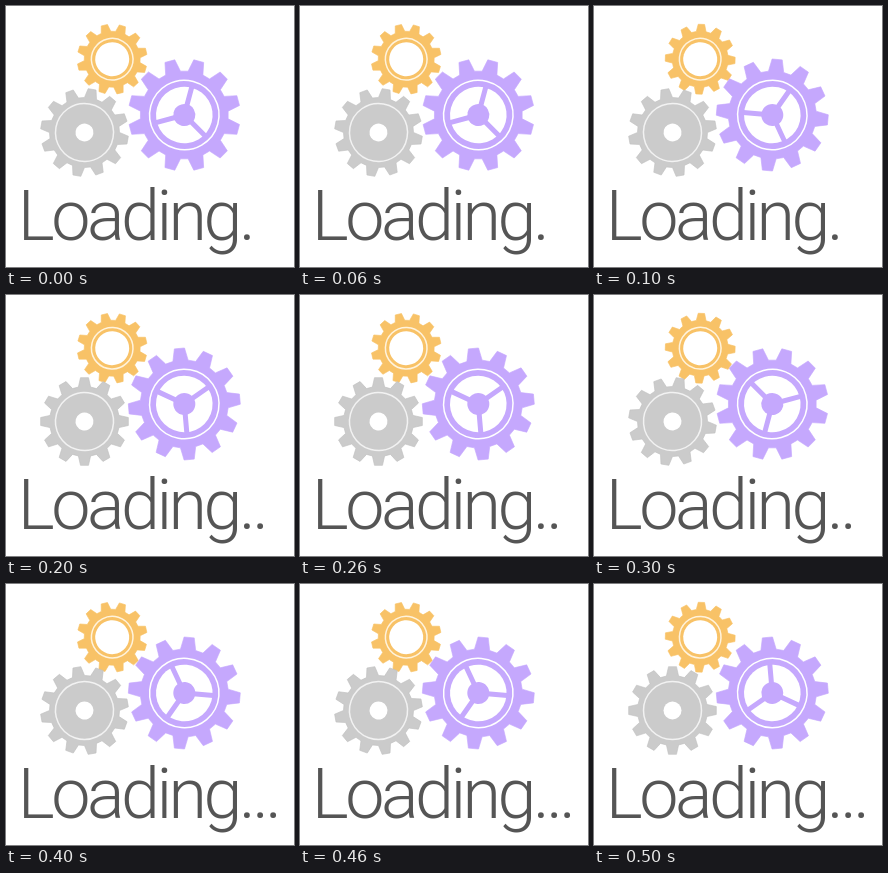
Recreate the animation shown at these times as an HTML page. Size 288x261 px, loop 0.6 s.

```html
<!DOCTYPE html>
<html lang="en">
<head>
<meta charset="utf-8">
<title>Loading</title>
<style>
  html, body { margin: 0; width: 100%; height: 100%; overflow: hidden; background: #fff; }
  svg { display: block; width: 100vw; height: 100vh; }
  text { font: 300 70px Roboto, "Open Sans", sans-serif; letter-spacing: -3.5px; fill: #555; }
</style>
</head>
<body>
<svg viewBox="0 0 288 261">
  <g id="gears"></g>
  <text id="label" x="11.8" y="234.2"></text>
</svg>
<script>
const STEP = 100, STEPS = 6, TEETH = 12;
const gearLayer = document.getElementById("gears");
const label = document.getElementById("label");

// start: angle of one tooth at time 0; turn: degrees per step
const gears = [
  { x: 106.2, y: 53.2, tip: 35, root: 28, ring: 20.8, hole: 17, color: "#f8c267", edge: "#f8c267", line: "#fff3dc", start: -103, turn: -15 },
  { x: 78.5, y: 126.5, tip: 44, root: 35, ring: 29, hole: 9, color: "#cbcbcb", edge: "#c0c0c0", line: "#f2f2f2", start: -80, turn: -20 },
  { x: 178.3, y: 109, tip: 56, root: 44, ring: 34.7, hole: 28.3, color: "#c5a8fd", edge: "#c5a8fd", line: "#fff", start: -75, turn: 20, hub: 11 }
];

function point(radius, degrees) {
  const a = degrees * Math.PI / 180;
  return (radius * Math.cos(a)).toFixed(2) + " " + (radius * Math.sin(a)).toFixed(2);
}

function outline({ tip, root }) {
  const points = [];
  for (let i = 0; i < TEETH; i++) {
    const a = i * 360 / TEETH;
    points.push(point(root, a - 10), point(tip, a - 5.2), point(tip, a + 5.2), point(root, a + 10));
  }
  return "M" + points.join("L") + "Z";
}

function spokes(g) {
  const bars = [0, 120, 240].map(a => `M0 0L${point(g.hole + 1, a)}`).join("");
  return `<path d="${bars}" stroke="${g.color}" stroke-width="5"/><circle r="${g.hub}" fill="${g.color}"/>`;
}

for (const g of gears) {
  g.node = document.createElementNS("http://www.w3.org/2000/svg", "g");
  g.node.innerHTML = `<path d="${outline(g)}" fill="${g.color}" stroke="${g.edge}" stroke-width=".6"/>
    <circle r="${g.ring}" fill="none" stroke="${g.line}" stroke-width="1.5"/>
    <circle r="${g.hole}" fill="#fff"/>${g.hub ? spokes(g) : ""}`;
  gearLayer.append(g.node);
}

function draw(now) {
  const step = Math.floor(now / STEP) % STEPS;
  for (const g of gears) {
    g.node.setAttribute("transform", `translate(${g.x} ${g.y}) rotate(${g.start + g.turn * step})`);
  }
  label.textContent = "Loading" + ".".repeat(1 + Math.floor(step / 2));
}

const begin = performance.now();
function tick() {
  draw(performance.now() - begin);
  requestAnimationFrame(tick);
}
tick();
</script>
</body>
</html>
```
